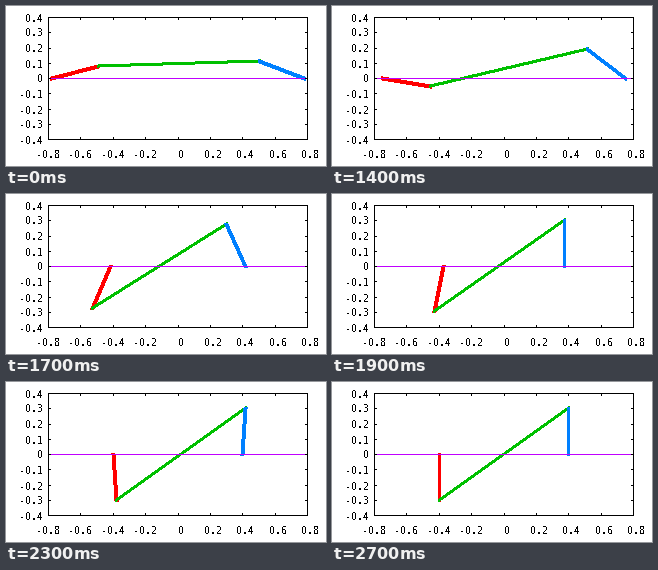
Write a matplotlib script that moves like this. It is 320 px wide and 160 px high and loops after 6000 ms.

```python
import numpy as np
import matplotlib.pyplot as plt
from matplotlib.animation import FuncAnimation
from matplotlib.patches import Polygon

W, H, DPI = 320, 160, 100
PX = 72 / DPI                       # one pixel in points
LEFT, RIGHT, TOP, BOTTOM = 42, 301, 11, 133
TICK = 2
ARM, ROD = 0.3, 1.0
HOLD, INTERVAL, FRAMES = 11, 100, 60

# Arm angles in degrees: the linkage buckles, overshoots and settles upright.
LEFT_ANGLE = [15.2, 13.7, 7.5, -10.6, -50, -94, -112, -111, -101.5,
              -91, -85.5, -85, -87, -89.5, -91, -90.7, -90]
RIGHT_ANGLE = [22, 23.4, 28, 38.6, 50, 58, 67, 78.5, 90,
               98, 101, 98.5, 94, 90.7, 89, 89.4, 90]

plt.rcParams.update({
    "font.family": "DejaVu Sans Mono",
    "font.size": 10 * PX,
    "text.antialiased": False,
    "toolbar": "None",
})


def to_px(x, y):
    return (LEFT + (x + 0.8) / 1.6 * (RIGHT - LEFT),
            TOP + (0.4 - y) / 0.8 * (BOTTOM - TOP))


def to_pixel(x, y):
    return np.floor(np.array(to_px(x, y)) + 0.5)


fig = plt.figure(figsize=(W / DPI, H / DPI), dpi=DPI, facecolor="white")
ax = fig.add_axes([0, 0, 1, 1])
ax.set(xlim=(-0.5, W - 0.5), ylim=(H - 0.5, -0.5))
ax.axis("off")


def hairline(xs, ys, color="black", z=4):
    # Points sit on pixel centres already, so snapping would shift them.
    ax.plot(xs, ys, color=color, lw=PX, zorder=z, antialiased=False,
            snap=False, solid_capstyle="projecting", solid_joinstyle="miter")


def label(value):
    text = "0" if value == 0 else f"{value:.1f}"
    return text.replace("0", "O")   # zero without the inner dot


def draw_axes():
    hairline([LEFT, RIGHT, RIGHT, LEFT, LEFT],
             [TOP, TOP, BOTTOM, BOTTOM, TOP])
    for k in range(-4, 5):
        x, y = to_pixel(k / 5, k / 10)
        for edge, inward in ((TOP, TICK), (BOTTOM, -TICK)):
            hairline([x, x], [edge, edge + inward])
        for edge, inward in ((LEFT, TICK), (RIGHT, -TICK)):
            hairline([edge, edge + inward], [y, y])
        ax.text(36.5, y, label(k / 10), ha="right", va="center_baseline")
        # Numbers without a sign keep its space, half a character each side.
        sign_space = 3 if k >= 0 else 0
        ax.text(x + sign_space, 151, label(k / 5), ha="center", va="baseline")
    zero = to_pixel(0, 0)[1]
    hairline([LEFT, RIGHT], [zero, zero], "#c000ff", z=3)


def thick_line(start, end, width):
    """Corners of a bar whose cross runs are whole pixels."""
    delta = end - start
    major = np.argmax(np.abs(delta))
    along = abs(delta[major]) / np.hypot(*delta)
    run = int(width / along)
    side = np.zeros(2)
    side[1 - major] = 1
    cap = delta / abs(delta[major]) * along * width / 2
    shift = side * (-0.5 if run % 2 == 0 else 0)
    a, b = start - cap + shift, end + cap + shift
    half = side * run / 2
    return np.array([a - half, b - half, b + half, a + half])


def linkage(step):
    a, b = np.radians([LEFT_ANGLE[step], RIGHT_ANGLE[step]])
    ya, yb = ARM * np.sin(a), ARM * np.sin(b)
    span = ARM * (np.cos(a) + np.cos(b)) + np.sqrt(ROD**2 - (yb - ya)**2)
    half = span / 2
    xs = np.array([-half, -half + ARM * np.cos(a),
                   half - ARM * np.cos(b), half])
    return to_pixel(xs, np.array([0, ya, yb, 0])).T


draw_axes()
WIDTHS = (3, 2, 3)
bars = [ax.add_patch(Polygon(np.zeros((4, 2)), facecolor=color, lw=0,
                             antialiased=False, snap=False, zorder=2))
        for color in ("#ff0000", "#00c000", "#0080ff")]


def update(frame):
    step = min(max(frame - HOLD, 0), len(LEFT_ANGLE) - 1)
    joints = linkage(step)
    for bar, start, end, width in zip(bars, joints, joints[1:], WIDTHS):
        bar.set_xy(thick_line(start, end, width))
    return bars


anim = FuncAnimation(fig, update, frames=FRAMES, interval=INTERVAL,
                     repeat=True, repeat_delay=0)
plt.show()
```
